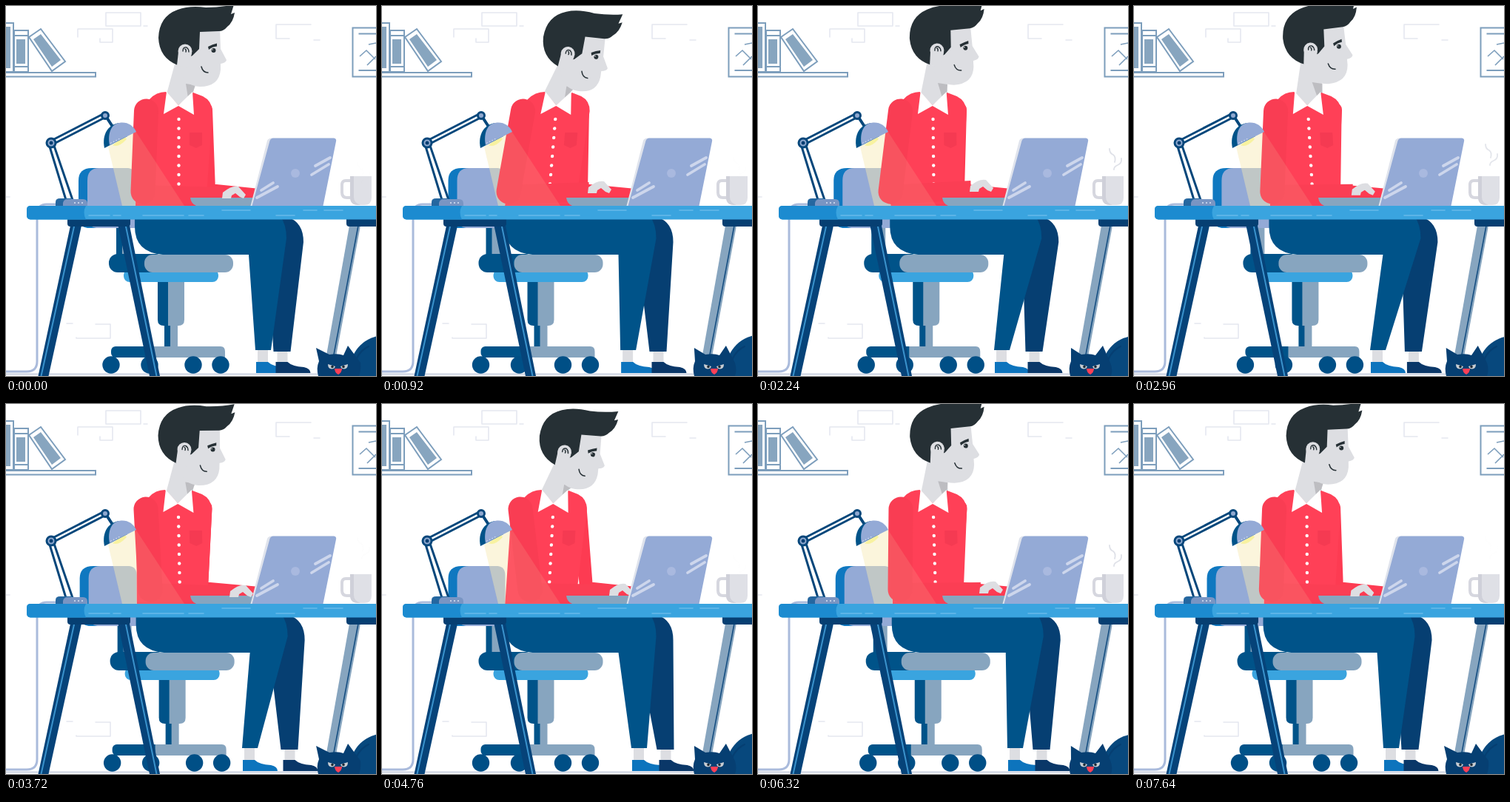
An HTML page for the animation above (7680 ms loop, 500 by 500 pixels).

```html
<!DOCTYPE html>
<html lang="en">
<head>
<meta charset="utf-8">
<title>Working at the desk</title>
<style>
  html, body { margin: 0; width: 100%; height: 100%; overflow: hidden; background: #fff; }
  svg { display: block; width: 100vw; height: 100vh; }
  .line { fill: none; stroke-linecap: round; stroke-linejoin: round; }
  .navy { fill: #063f72; }
  .blue { fill: #005389; }
  .sky { fill: #3aa4df; }
  .steel { fill: #87a5bf; }
  .lilac { fill: #94aad6; }
  .skin { fill: #dddee2; }
  .hair { fill: #263035; }
  .shirt { fill: #ff4057; }
</style>
</head>
<body>
<svg viewBox="0 0 500 500" preserveAspectRatio="none">
  <!-- wall -->
  <path class="line" stroke="#e5e8f0" stroke-width="1.6" d="M135 9H182V27H135ZM97 42V31H144V49H127V44M186 27H191M383 44H365V25H412M365 25V44M416 46H424M82 429H90M95 448V449H141V430H121M0 258H5"/>
  <g fill="none" stroke="#7d9ebc" stroke-width="2">
    <path d="M-5 90H121V95.500H-5Z"/>
    <path d="M-5 23H10V89H-5M11 33H30V89H11ZM11 40H30M11 82H30M31 42 47 31 80 75 62 88Z"/>
    <path d="M468.500 29.500H510V95.500H468.500ZM476.500 37.500H510V87H476.500"/>
    <path d="M478 68 487 60 499 72M488 80 500 68M490 52 500 50" stroke-width="1.6"/>
  </g>
  <path class="steel" d="M0 28H6V84H0ZM14 45H26V78H14ZM37 45 47 38 74 73 62 82Z"/>
  <path d="M0 497.5H500" stroke="#c9d0df" stroke-width="2"/>

  <!-- chair -->
  <g id="chair">
    <path fill="#0f78c0" d="M98 236Q98 219 116 219H160V300H110Q98 298 98 286Z"/>
    <path class="lilac" d="M110 236Q110 219 126 219H165Q175 220 175 232V300H122Q110 298 110 286Z"/>
    <path class="blue" d="M149 300H158V340H149Z"/>
    <path class="steel" d="M157 300H168V340H157Z"/>
    <path class="blue" d="M214 425H223V465H214Z"/>
    <path class="steel" d="M222 425H232V465H222Z"/>
    <path class="blue" d="M205 370H222V432H213Q205 432 205 424Z"/>
    <path class="steel" d="M219 370H241V424Q241 432 233 432H219Z"/>
    <rect class="sky" x="159" y="356" width="128" height="17" rx="8"/>
    <rect class="blue" x="139" y="335" width="75" height="25" rx="12"/>
    <rect class="steel" x="187" y="336" width="120" height="24" rx="11"/>
    <rect class="blue" x="142" y="460" width="80" height="15" rx="6"/>
    <path class="steel" d="M200 460H290Q296 460 296 467V475H200Z"/>
    <g fill="#004f86">
      <circle cx="142" cy="485" r="11.7"/><circle cx="194" cy="485" r="11.7"/>
      <circle cx="253" cy="485" r="11.7"/><circle cx="290" cy="485" r="11.7"/>
    </g>
  </g>
  <path fill="#f5efb4" opacity=".36" d="M138 190 175 169 241 270H157Z"/>

  <!-- legs -->
  <g id="nearFoot">
    <path class="skin" d="M2 455H16V483H2Z"/>
    <path fill="#0d74bd" d="M0 481H16Q22 487 38 488Q47 490 47 496H0Z"/>
  </g>
  <g id="farFoot">
    <path class="skin" d="M2 455H16V483H2Z"/>
    <path fill="#0a3768" d="M0 481H16Q22 487 38 488Q47 490 47 496H0Z"/>
  </g>
  <path id="farLeg" class="navy"/>
  <path id="nearLeg" class="blue"/>

  <!-- upper body -->
  <path id="neck" class="skin"/>
  <path id="shade" fill="#bdbdc1"/>
  <path id="farArm" class="line" stroke="#fd3b52" stroke-width="18"/>
  <g id="torso">
    <path class="shirt" d="M216 116Q203 116 194 126L177 150 175 272H270L279 142Q278 128 266 122L253 117 233 134Z"/>
    <path fill="#ef3850" d="M248 171H265V188L257 192 248 188Z" opacity=".65"/>
    <path fill="#fff" d="M217 116 233 134 252 116 254 147 233 135 213 146Z"/>
    <g id="buttons" fill="#fff"></g>
  </g>
  <path id="foreArm" class="line" stroke="#fb3e54" stroke-width="26" style="stroke-linecap:butt"/>
  <path id="upperArm" class="line" stroke="#f93d53" stroke-width="33"/>
  <g id="head">
    <path class="skin" d="M228 30H289L290 58 298 73Q297 77 290 78V86Q288 109 262 109 242 108 236 88Z"/>
    <path class="hair" d="M232 80Q207 70 206 43 207 14 232 5 248 -1 270 2 290 2 308 -2L304 11 309 9Q307 22 299 28 294 34 288 34L262 35 261 58 252 67 240 72Z"/>
    <circle class="skin" cx="242" cy="61" r="9.5"/>
    <path class="skin" d="M233 62 251 64 246 84 231 80Z"/>
    <path class="line" stroke="#263035" stroke-width="1.4" d="M239 61Q239 55 244 56 247 58 247 62M242 58Q244 59 243 62"/>
    <path class="hair" d="M273 55Q279 52 285 50.500V54.500Q279 55 274 59Z"/>
    <circle class="hair" cx="280.500" cy="60" r="3"/>
    <circle cx="279" cy="59" r=".7" fill="#fff"/>
    <path class="line" stroke="#263035" stroke-width="1.5" d="M264 82Q266 90 273 90"/>
  </g>

  <!-- laptop -->
  <path class="steel" d="M249 259H335V270H257Q250 267 249 259Z"/>
  <path id="hand" class="skin" d="M-16 8-15 0Q-3 -10 6 -8L16 3 13 8 8 6 2 1-3 4-4 8Z"/>
  <path fill="#dfe3ec" d="M358 178.500Q354 179 353 182L330.500 270H336L361 179Z"/>
  <path class="lilac" d="M361 178.500H443Q447 179 446 183L428.500 270H332.500L356.500 182Q358 178.500 361 178.500Z"/>
  <path class="line" stroke="#cdd6ec" stroke-width="3.800" d="M418 216 438 205M413 228 436 214M345 249 361 239M339 259 367 244"/>
  <circle cx="391" cy="226" r="6" fill="#a9b9df"/>

  <!-- mug -->
  <path class="line" stroke="#d6d7df" stroke-width="4" d="M466 236H459Q454 236 454 242V252Q454 259 461 259H467"/>
  <path fill="#dfe0e6" d="M465 230H494V259Q494 269 484 269H476Q465 269 465 258Z"/>
  <path fill="#cfd0d9" d="M465 230H470V258Q470 266 479 269H476Q465 269 465 258Z"/>
  <path id="steam" class="line" stroke="#dddfe7" stroke-width="1.800" d="M475 193Q475 199 480 201 484 204 482 211M491 206Q492 213 486 215 481 217 481 221"/>

  <!-- lamp -->
  <path fill="#f0dca8" opacity=".14" d="M138 190 175 169 241 270H157Z"/>
  <g class="line" stroke="#06477b">
    <path stroke-width="3" d="M59 190 81 262M65 189 90 262M61 182 133 145M63 187 135 150"/>
    <path stroke-width="4" d="M135 149 146 166"/>
  </g>
  <g fill="#8fa8cf" stroke="#06477b" stroke-width="3">
    <circle cx="61" cy="185" r="6"/><circle cx="134" cy="148" r="4.500"/>
  </g>
  <circle class="navy" cx="61" cy="185" r="2.500"/>
  <path fill="#f8f2a0" d="M144 188Q152 192 163 180L160 176Z"/>
  <path class="blue" d="M133 192C129 173 139 159 154 158L164 176Z"/>
  <path class="lilac" d="M140 188C137 171 143 159 153 158 163 156 172 161 176 170Z"/>
  <path class="line" stroke="#d9e2f4" stroke-width="1.500" stroke-dasharray="0 4" d="M142 185 154 179"/>
  <path class="line" stroke="#aabbdc" stroke-width="3" d="M68 268H55Q42 268 42 282V480Q42 494 28 494H0"/>
  <path fill="#2567a0" d="M67 270V265Q67 260 73 260H90V270Z"/>
  <path fill="#7995c3" d="M77 270V266Q78 261 84 261H104Q110 261 110 267V270Z"/>
  <path class="line" stroke="#dbe4f4" stroke-width="2" stroke-dasharray="0 5" d="M93 266H104"/>

  <!-- desk -->
  <path class="steel" d="M464 297H479L441 500H428Z"/>
  <path d="M476 297 437.500 500" stroke="#174f82" stroke-width="1.600"/>
  <path fill="#064379" d="M87 297H102L57.500 500H43.500ZM151.500 297H167L208 500H194Z"/>
  <path class="line" stroke="#3a92cc" stroke-width="2" d="M92 298 47.500 500M162 298 203.500 500"/>
  <path class="navy" d="M83 288H168V294Q168 298 164 298H87Q83 298 83 294ZM460 288H500V298H464Q460 298 460 294Z"/>
  <rect class="sky" x="28" y="270" width="490" height="18.500" rx="5"/>
  <path fill="#1c8bd0" d="M33 270H108Q103 279 108 288.500H33Q28 288 28 283V275Q28 270 33 270Z"/>
  <path class="line" stroke="#68bbea" stroke-width="1.500" d="M112 283H140M145 283H155M185 283H240M247 283H267M292 276H330M365 283H390M402 276H420M430 276H455"/>

  <!-- cat -->
  <ellipse id="catBody" cx="512" cy="491" rx="47" ry="46" fill="#07487d"/>
  <path class="line" stroke="#063f72" stroke-width="2" d="M470 492Q472 469 490 460"/>
  <path id="catHead" class="navy"/>
  <path fill="#c7ccd2" d="M435 484 445 487Q444 490.500 440 490.500 435 490 435 484ZM462 484 452 487Q453 490.500 457 490.500 462 490 462 484Z"/>
  <circle cx="441" cy="487.500" r="1.800" fill="#1d2a35"/><circle cx="456" cy="487.500" r="1.800" fill="#1d2a35"/>
  <path fill="#ff4057" d="M444 490H454Q454 495 449 498 444 495 444 490Z"/>
</svg>
<script>
const LOOP = 7680, SWAY = LOOP / 2;
const TIMES = [0, 920, 2240, 3720, 4760, 6320];
const el = {};
document.querySelectorAll('[id]').forEach(n => el[n.id] = n);
const set = (id, d) => el[id].setAttribute('d', d);
const move = (id, m) => el[id].setAttribute('transform', m);

el.buttons.innerHTML = Array.from({ length: 8 }, (_, i) =>
  `<circle cx="233.500" cy="${153 + i * 12.5}" r="2.200"/>`).join('');

const ramp = (t, a, b) => {
  const u = Math.min(1, Math.max(0, (t - a) / (b - a)));
  return u * u * (3 - 2 * u);
};
const swing = t => Math.sin(2 * Math.PI * t / SWAY);

// Sine of the given size plus a smooth periodic curve through the poses
function track(amp, poses) {
  const n = TIMES.length;
  const rest = poses.map((v, i) => v - amp * swing(TIMES[i]));
  const wrap = i => (i + n) % n;
  const time = i => TIMES[wrap(i)] + Math.floor(i / n) * LOOP;
  const val = i => rest[wrap(i)];
  const slope = i => (val(i + 1) - val(i - 1)) / (time(i + 1) - time(i - 1));
  return t => {
    let i = n - 1;
    while (TIMES[i] > t) i--;
    const h = time(i + 1) - time(i), u = (t - time(i)) / h, v = 1 - u;
    return amp * swing(t)
      + v * v * ((1 + 2 * u) * val(i) + u * h * slope(i))
      + u * u * ((3 - 2 * u) * val(i + 1) - v * h * slope(i + 1));
  };
}

const chestX = track(-1, [0, 1, 3, -.5, -2.5, 3.5]);
const headX = track(4, [0, 9, 0, -1, 4.5, .5]);
const headY = track(2.5, [0, 3.5, -1, .5, 4, -.7]);
const headTurn = track(6, [0, 8, -3.5, 1.5, 6.5, -4]);
const handX = track(0, [308, 294, 302, 318, 323, 315]);
const handY = track(0, [252, 245, 243, 253, 251, 248]);
const farElbow = track(0, [274, 269, 270, 264, 276, 266]);

function draw(t) {
  const hip = -8.5 * swing(t), chest = chestX(t);
  const near = 338 - 18 * (ramp(t, 150, 1200) - ramp(t, 3840, 4700));
  const far = 364.5 + 10 * (ramp(t, 2500, 3500) - ramp(t, 6500, 7500));

  move('chair', `translate(${hip} 0)`);
  move('nearFoot', `translate(${near} 0)`);
  move('farFoot', `translate(${far} 0)`);
  const x = v => v + hip;
  set('nearLeg', `M${x(174)} 270H${x(345)}Q${x(379)} 276 ${x(379)} 314L${near + 20} 465H${near - 1}L${x(328)} 336H${x(212)}Q${x(174)} 333 ${x(174)} 298Z`);
  set('farLeg', `M${x(330)} 275L${x(380)} 285Q${x(402)} 292 ${x(402)} 319L${far + 20} 467H${far - 3}L${x(353)} 325Z`);

  const lean = (hip - chest) / 115;
  move('torso', `matrix(1 0 ${lean} 1 ${chest - 150 * lean} 0)`);

  const hx = headX(t), hy = headY(t);
  move('head', `translate(${hx} ${hy}) rotate(${headTurn(t)} 242 62)`);
  set('neck', `M${229 + hx} ${75 + hy}L${217 + chest} 119L${233 + chest} 138L${253 + chest} 119L${256 + hx * .6} ${100 + hy}Z`);
  set('shade', `M${243 + hx * .7} ${105 + hy}L${256 + hx * .5} ${107 + hy}L${252 + chest} 118L${246 + chest} 124Z`);

  const e = farElbow(t);
  set('farArm', `M${270 + chest} 140L${e} 249L342 256`);
  const wx = handX(t), wy = handY(t), elbow = wx - 124;
  move('hand', `translate(${wx} ${wy})`);
  set('foreArm', `M${elbow} 255L${wx - 14} ${wy + 6}`);
  set('upperArm', `M${189.5 + chest} 142L${elbow + 1} 251`);

  const u = t % SWAY;
  el.steam.style.opacity = .04 + .9 * (ramp(u, 1100, 2100) - ramp(u, 2700, 3840));
  move('steam', `translate(0 ${(2240 - u) / 120})`);

  const open = Math.pow((1 + Math.cos(2 * Math.PI * t / SWAY)) / 2, 2);
  const l = 423 - 4 * open, r = 466 - 4 * open;
  set('catHead', `M${l} 462L437 471Q449 469 456 472L${r} 459L${476 + 3 * open} 482Q480 492 477 500H422Q419 489 423 480Z`);
  el.catBody.setAttribute('ry', 46 + .8 * swing(t));
}

const start = performance.now();
function tick() {
  draw((performance.now() - start) % LOOP);
  requestAnimationFrame(tick);
}
tick();
</script>
</body>
</html>
```
